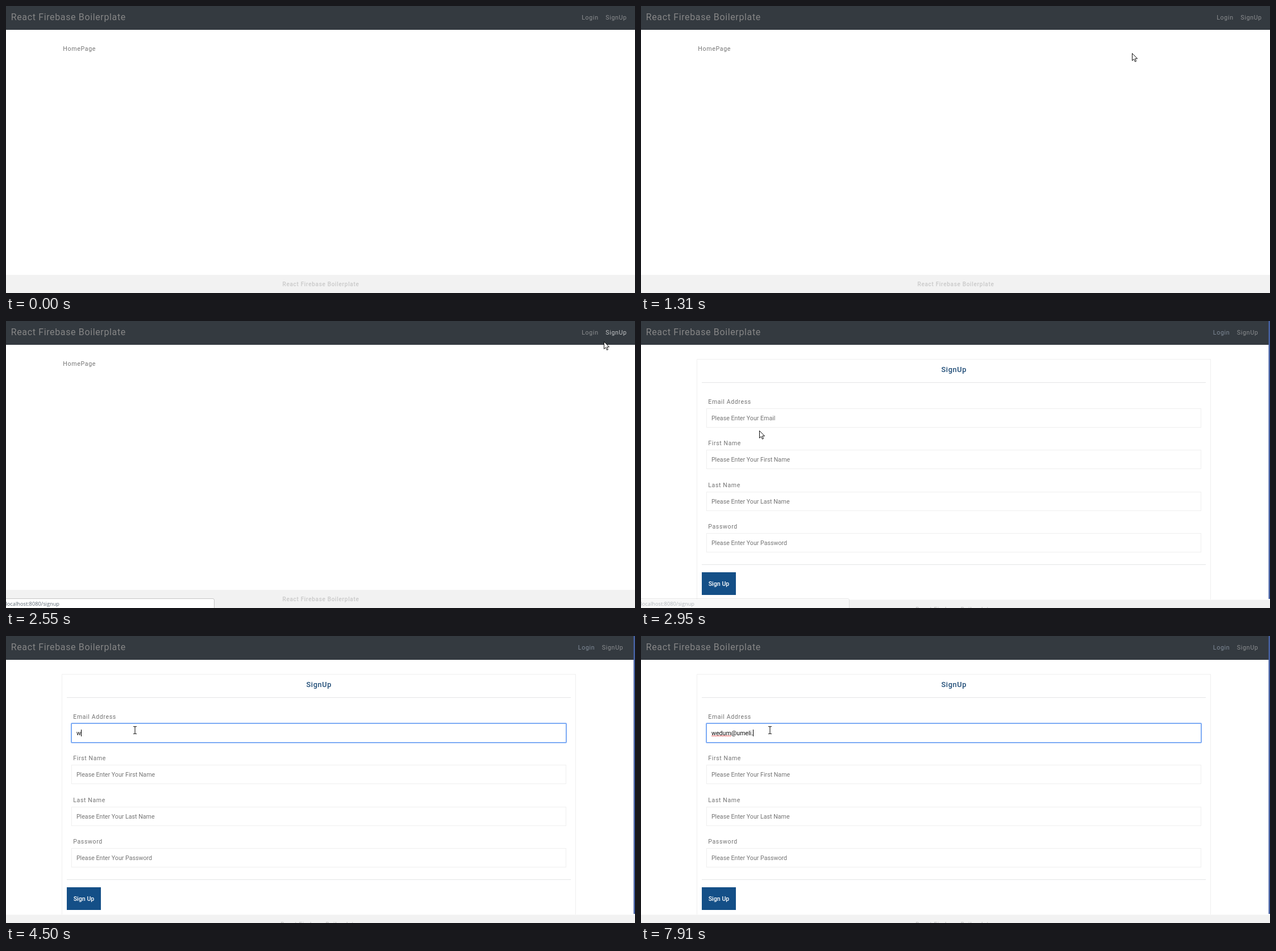
Animation, 1107 px wide and 506 px high, one loop 8000 ms. Source, as an HTML page:

```html
<!DOCTYPE html>
<html lang="en">
<head>
<meta charset="utf-8">
<title>Sign-up form</title>
<style>
html, body { margin: 0; width: 100%; height: 100%; overflow: hidden; background: #fff; }
svg { display: block; width: 1107px; height: 506px; }
text { font: 10.67px Roboto, sans-serif; fill: #757575; white-space: pre; }
.wide { letter-spacing: .64px; }
.label { font-size: 10.5px; fill: #737373; }
.brand { font-size: 16px; fill: #868686; }
.nav { fill: #8c8e90; }
.mid { text-anchor: middle; font-weight: 500; }
.foot { font-size: 10.1px; fill: #c9c9c9; }
.title { font-size: 12.8px; fill: #1d4a75; }
.box { fill: none; stroke: #efefef; }
.line { fill: #e4e5e6; }
</style>
</head>
<body>
<svg viewBox="0 0 1107 506">
  <rect width="1107" height="506" fill="#fff"/>
  <g id="home">
    <text class="wide" x="100.2" y="79">HomePage</text>
  </g>
  <g id="form">
    <path class="box" d="M98.5 491V67.5H1002.5V491"/>
    <text class="wide mid title" x="550.8" y="90">SignUp</text>
    <rect class="line" x="107" y="108" width="887" height="1"/>
    <g id="fields"></g>
    <rect class="line" x="107" y="429" width="887" height="1"/>
    <rect x="107" y="443" width="60" height="40" fill="#144f87"/>
    <text class="mid" x="137" y="467" style="fill:#fff">Sign Up</text>
    <rect id="ring" x="115" y="154" width="871" height="34" rx="1" fill="none" stroke="#7dabf4" stroke-width="2"/>
    <text id="typed" x="123.9" y="175" style="fill:#111"></text>
    <path id="wavy" fill="none" stroke="#e33" stroke-width=".9"/>
    <rect id="caret" y="165" width="1" height="12" fill="#000"/>
  </g>
  <g id="footer">
    <rect y="474" width="1107" height="34" fill="#f2f2f2"/>
    <text id="footText" class="wide mid foot" y="494">React Firebase Boilerplate</text>
  </g>
  <rect width="1107" height="42" fill="#343a40"/>
  <text class="wide brand" x="8.7" y="25">React Firebase Boilerplate</text>
  <g id="links">
    <text id="login" class="wide nav" x="1013.2" y="24">Login</text>
    <text id="signup" class="wide nav" x="1055.2" y="24">SignUp</text>
  </g>
  <rect id="scroll" x="1104.5" width="2.5" height="490" fill="#4661a3"/>
  <g id="status">
    <path d="M-1 507V489.5H364Q366.5 489.5 366.5 492V507" fill="#fff" stroke="#c6c6c6"/>
    <text x="-.6" y="502" style="font:9.25px 'Open Sans',sans-serif;fill:#5c6873">localhost:8080/signup</text>
  </g>
  <path id="arrow" d="M.5 .5V13.3L3.5 10.6L5.5 15.2L7.5 14.3L5.6 9.8H9.6Z" fill="#fff" stroke="#111"/>
  <path id="beam" d="M-3 -6.5H-1L0 -5.5L1 -6.5H3M0 -5.5V5.5M-3 6.5H-1L0 5.5L1 6.5H3" fill="none" stroke="#222" stroke-width="1.1"/>
</svg>
<script>
const $ = id => document.getElementById(id);
const show = (id, on) => $(id).style.display = on ? '' : 'none';
const clamp = v => Math.max(0, Math.min(1, v));

const LOOP = 8000, ENTER = 380, OPEN = 2640, FOCUS = 3570;
const email = 'wedum@umeli.';
const keys = [4500, 4730, 5050, 5210, 5360, 6140, 6530, 6690, 6840, 6920, 7300, 7910];

// Pointer moves: start, end, steps, target x, y, easing power for x, y
const moves = [
  [380, 840, 7, 644, 158, 1, 1],
  [1000, 1710, 10, 1050, 50, 1.13, 1.7],
  [1810, 2170, 6, 1052, 36, 1, 1],
  [2640, 2950, 5, 208, 193, 1.3, 1.3],
  [3020, 3100, 2, 227, 159, 1, 1],
  [3420, 3570, 3, 227, 166, 1, 1]
];

$('fields').innerHTML = ['Email Address', 'First Name', 'Last Name', 'Password'].map((name, i) => {
  const y = Math.floor(154 + 73.6 * i), hint = name.replace(' Address', '');
  return `<rect class="box" x="115.5" y="${y + .5}" width="870" height="33"/>
    <text class="wide label" x="118.3" y="${y - 8}">${name}</text>
    <text id="hint${i}" x="123.9" y="${y + 21}">Please Enter Your ${hint}</text>`;
}).join('');
$('wavy').setAttribute('d', 'M124 175.5' + 'l1.45 1.3 1.45 -1.3'.repeat(12));

function pointer(t) {
  let x = 1045, y = 483.5;
  for (const [start, end, n, tx, ty, px, py] of moves) {
    if (t < start) break;
    const step = Math.floor((t - start) / (end - start) * (n - 1) + .15) + 1;
    const left = 1 - Math.min(n, step) / n;
    x = tx + (x - tx) * left ** px;
    y = ty + (y - ty) * left ** py;
  }
  return [Math.round(x), Math.round(y)];
}

function draw(t) {
  const open = t >= OPEN, focus = t >= FOCUS;
  show('home', !open);
  show('form', open);
  show('scroll', open);
  $('footer').setAttribute('transform', `translate(0 ${open ? 17.5 : 0})`);
  $('footText').setAttribute('x', open ? 550.8 : 554);
  $('links').setAttribute('transform', `translate(${open ? -6.4 : 0})`);
  $('login').style.fill = open ? '#808b98' : '';
  $('signup').style.fill = t >= 2000 && !open ? '#c3c5c6' : '';
  $('status').style.opacity = clamp((t - 2240) / 200) * clamp((3070 - t) / 280);

  const [x, y] = pointer(t), overField = open && y < 188 && x < 235 && t >= 3020;
  show('arrow', t >= ENTER && !overField);
  show('beam', overField);
  $('arrow').setAttribute('transform', `translate(${x} ${y})`);
  $('beam').setAttribute('transform', `translate(${x} ${y})`);

  const count = keys.filter(k => t >= k).length;
  $('typed').textContent = email.slice(0, count);
  show('hint0', !count);
  show('ring', focus);
  show('wavy', count > 5);
  const blink = t >= 4120 && t < keys[0] || t >= 5910 && t < keys[5];
  show('caret', focus && !blink);
  const width = count ? $('typed').getComputedTextLength() : 0;
  $('caret').setAttribute('x', Math.round(123.9 + width));
}

function tick() {
  draw(performance.now() % LOOP);
  requestAnimationFrame(tick);
}
tick();
</script>
</body>
</html>
```
